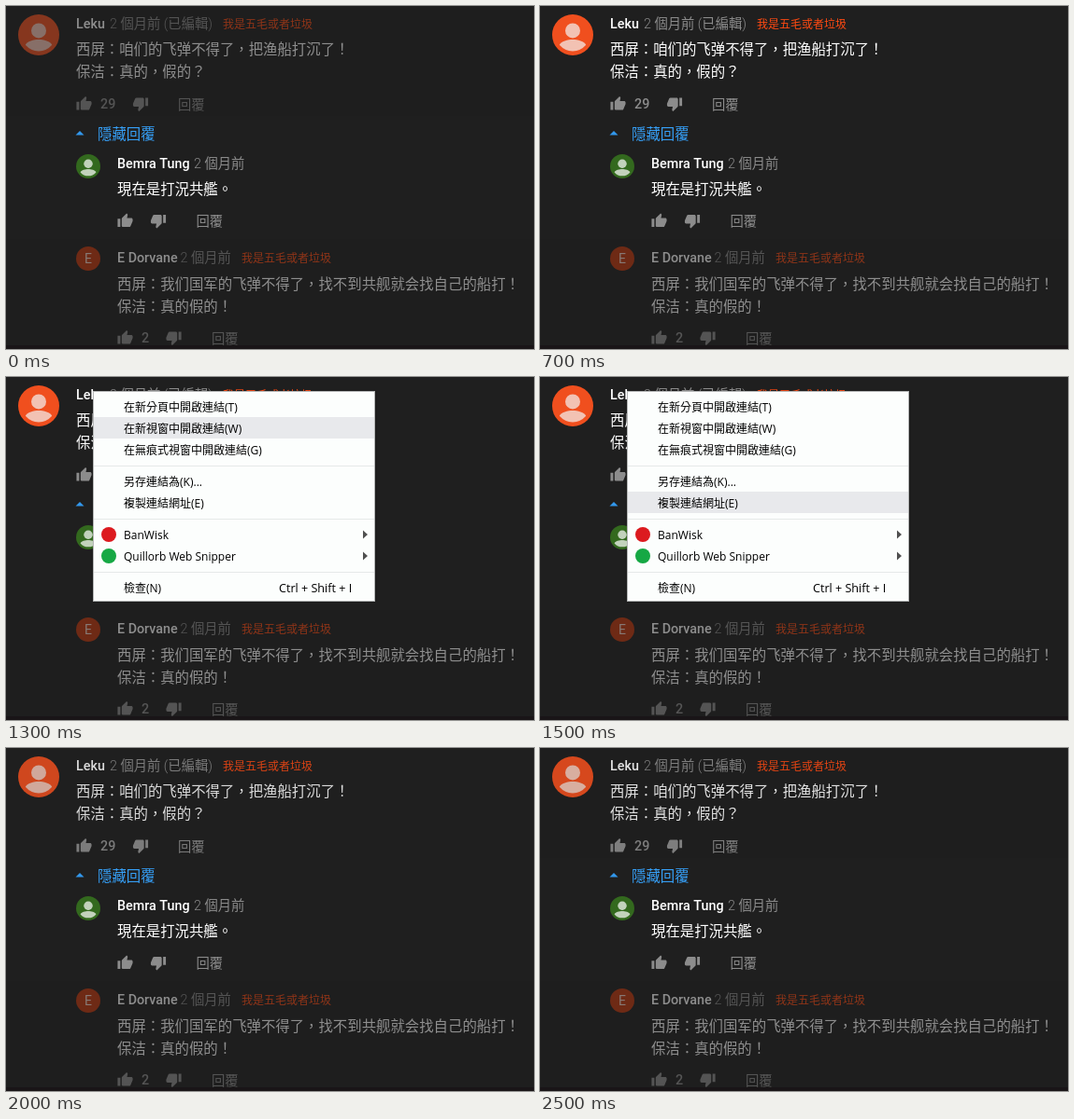
Recreate the animation shown at these times as an HTML page with a canvas. Size 565 by 368 pixels, loop 2.6 s.

```html
<!DOCTYPE html>
<html lang="zh-Hant">
<head>
<meta charset="utf-8">
<title>Comment thread</title>
<style>
html, body { margin: 0; width: 100%; height: 100%; overflow: hidden; background: #1f1f1f; }
canvas { display: block; width: 565px; height: 368px; }
</style>
</head>
<body>
<canvas id="stage"></canvas>
<script>
const W = 565, H = 368, LOOP = 2600, STEP = 100;
const BG = '#1f1f1f', GREY = '#8c8c8c', WHITE = '#ffffff', BADGE = '#ff4a12';
const CJK = '"Noto Sans CJK TC", "Noto Sans CJK SC", "Noto Sans CJK JP", "Noto Sans CJK", sans-serif';
const PAGE_FONT = 'Roboto, ' + CJK;
const THIN_FONT = 'Roboto, "Noto Sans CJK TC Light", ' + CJK;
const MENU_FONT = '"Open Sans", "Noto Sans", ' + CJK;

const canvas = document.getElementById('stage');
const ctx = canvas.getContext('2d');
const ratio = window.devicePixelRatio || 1;
canvas.width = W * ratio;
canvas.height = H * ratio;

const thumb = new Path2D('M1 21h4V9H1v12zm22-11c0-1.1-.9-2-2-2h-6.31l.95-4.57.03-.32c0-.41-.17-.79-.44-1.06L14.17 1 7.59 7.59C7.22 7.95 7 8.45 7 9v10c0 1.1.9 2 2 2h9c.83 0 1.54-.5 1.84-1.22l3.02-7.05c.09-.23.14-.47.14-.73v-2z');
const shoulders = new Path2D('M-14.2 10.8C-13 6.8-5 5 0 5S13 6.8 14.2 10.8Q8.5 17.4 0 17.4T-14.2 10.8z');

// [time, opacity] of the top comment
const FADE = [[0, 0.5], [400, 0.5], [700, 1], [1800, 1], [1900, 0.95], [2300, 0.5], [2500, 0.88]];

const MENU = { x: 94, y: 16, w: 300, h: 224 };
const ITEMS = [
  ['在新分頁中開啟連結(T)', 32],
  ['在新視窗中開啟連結(W)', 55],
  ['在無痕式視窗中開啟連結(G)', 78],
  ['另存連結為(K)...', 112],
  ['複製連結網址(E)', 135],
  ['BanWisk', 169, '#dc1a1f'],
  ['Quillorb Web Snipper', 192, '#16a844'],
  ['檢查(N)', 226]
];

function text(str, x, y, size, color, weight = 400, family = PAGE_FONT) {
  ctx.font = `${weight} ${size}px ${family}`;
  ctx.fillStyle = color;
  ctx.fillText(str, x, y);
}

function thinText(str, x, y, size, color) {
  text(str, x, y, size, color, 300, THIN_FONT);
}

function rect(x, y, w, h, color) {
  ctx.fillStyle = color;
  ctx.fillRect(x, y, w, h);
}

function disc(x, y, r, color) {
  ctx.fillStyle = color;
  ctx.beginPath();
  ctx.arc(x, y, r, 0, Math.PI * 2);
  ctx.fill();
}

function triangle(color, ...p) {
  ctx.fillStyle = color;
  ctx.beginPath();
  ctx.moveTo(p[0], p[1]);
  ctx.lineTo(p[2], p[3]);
  ctx.lineTo(p[4], p[5]);
  ctx.fill();
}

function person(x, y, r, back, front) {
  disc(x, y, r, back);
  ctx.save();
  ctx.translate(x, y);
  ctx.scale(r / 22, r / 22);
  disc(0, -4.6, 8, front);
  ctx.fill(shoulders);
  ctx.restore();
}

function drawThumb(cx, cy, turn) {
  ctx.save();
  ctx.translate(cx, cy);
  ctx.rotate(turn);
  ctx.scale(0.733, 0.733);
  ctx.translate(-12, -12);
  ctx.fillStyle = GREY;
  ctx.fill(thumb);
  ctx.restore();
}

function actions(x, cy, count, downX, replyX) {
  drawThumb(x + 8.5, cy, 0);
  text(count, x + 26, cy + 5, 14.3, GREY, 500);
  drawThumb(downX, cy, Math.PI);
  thinText('回覆', replyX, cy + 5.5, 14.3, GREY);
}

function header(name, x, y, date, dateX, badgeX) {
  text(name, x, y, 14.3, WHITE, 500);
  thinText(date, dateX, y, 14.3, GREY);
  if (badgeX) thinText('我是五毛或者垃圾', badgeX, y - 0.5, 12, BADGE);
}

function body(lines, x, y) {
  lines.forEach((line, i) => thinText(line, x, y + i * 24, 15.4, WHITE));
}

// Covering with the page colour fades a whole comment as one group.
function veil(y, h, opacity) {
  ctx.globalAlpha = 1 - opacity;
  rect(0, y, W, h, BG);
  ctx.globalAlpha = 1;
}

function opacityAt(t) {
  let i = FADE.length - 1;
  while (FADE[i][0] > t) i--;
  const [t0, a] = FADE[i];
  if (i === FADE.length - 1) return a;
  const [t1, b] = FADE[i + 1];
  return a + (b - a) * (t - t0) / (t1 - t0);
}

function hoverAt(t) {
  if (t < 1300) return -1;
  if (t < 1400) return 1;
  return t < 1500 ? 2 : 4;
}

function drawThread(opacity) {
  person(35, 31, 22, '#f04f1e', '#f2c2b3');
  header('Leku', 75, 24, '2 個月前 (已編輯)', 111, 232);
  body(['西屏：咱们的飞弹不得了，把渔船打沉了！', '保洁：真的，假的？'], 75, 52);
  actions(75, 105, '29', 144, 184);
  veil(0, 118, opacity);

  triangle('#3297ec', 74.5, 138.5, 79, 134, 83.5, 138.5);
  thinText('隱藏回覆', 98, 142.5, 15.4, '#36a0f8');

  person(88, 172, 13, '#33691e', '#c2d2bc');
  header('Bemra Tung', 119, 174, '2 個月前', 201);
  body(['現在是打況共艦。'], 119, 202);
  actions(119, 230.5, '', 163, 203.5);

  disc(88, 271, 13, '#bf360c');
  ctx.textAlign = 'center';
  text('E', 88, 276, 14, '#f2d6cd');
  ctx.textAlign = 'left';
  header('E Dorvane', 119, 275, '2 個月前', 186.5, 252);
  body(['西屏：我们国军的飞弹不得了，找不到共舰就会找自己的船打！', '保洁：真的假的！'], 119, 304);
  actions(119, 356, '2', 179.5, 220);
  veil(250, 118, 0.5);

  rect(0, 364, W, 4, '#191517');
}

function drawMenu(hover) {
  const { x, y, w, h } = MENU;
  rect(x - 1, y - 1, w + 2, h + 2, '#b4b6b6');
  rect(x, y, w, h, '#fcfefd');
  if (hover >= 0) rect(x, ITEMS[hover][1] - 12, w, 23, '#e8e9ec');
  for (const lineY of [95, 152, 209]) rect(x, lineY, w, 1, '#e6e9e9');
  for (const [label, cy, color] of ITEMS) {
    text(label, 126, cy + 4.5, 12, '#000000', 400, MENU_FONT);
    if (color) {
      disc(110, cy, 8, color);
      triangle('#505050', 382, cy - 4.5, 387, cy, 382, cy + 4.5);
    }
  }
  text('Ctrl + Shift + I', 292, 230.5, 12.6, '#000000', 400, MENU_FONT);
}

function draw(now) {
  const t = Math.floor((now % LOOP) / STEP) * STEP;
  ctx.setTransform(ratio, 0, 0, ratio, 0, 0);
  rect(0, 0, W, H, BG);
  drawThread(opacityAt(t));
  if (t >= 1100 && t < 1900) drawMenu(hoverAt(t));
}

const start = performance.now();
function tick() {
  draw(performance.now() - start);
  requestAnimationFrame(tick);
}
tick();
</script>
</body>
</html>
```
